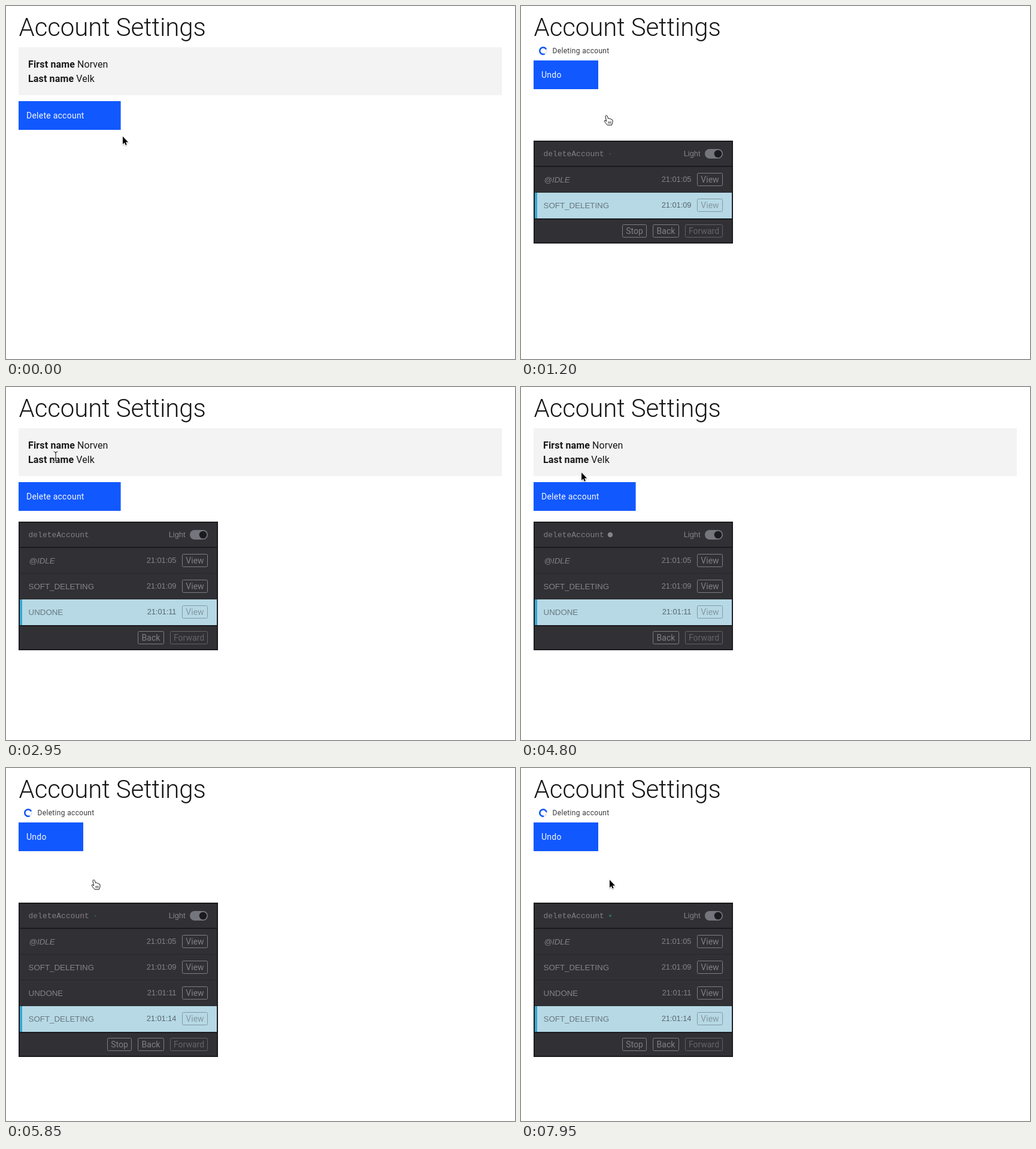
These frames come from a looping animation (850 by 590 pixels, 8 s). An HTML page:

```html
<!DOCTYPE html>
<html lang="en">
<head>
<meta charset="utf-8">
<title>Account Settings</title>
<style>
  html, body { margin: 0; width: 100%; height: 100%; overflow: hidden; background: #fff; }
  svg { display: block; width: 850px; height: 590px; }
  text { font: 14px Roboto, sans-serif; fill: #161616; }
  .title { font-size: 42px; font-weight: 300; letter-spacing: -.1px; }
  .field { font-size: 16px; letter-spacing: .05px; }
  .field .label { font-weight: 600; letter-spacing: .15px; }
  .action { fill: #f4f7ff; letter-spacing: .25px; }
  .status { font-size: 12px; letter-spacing: .33px; fill: #393939; }
  .machine { font: 13px "Liberation Mono", monospace; fill: #808085; }
  .state { font: 13.33px "Liberation Sans", sans-serif; fill: #838388; }
  .initial { font-style: italic; }
  .time { font: 12.8px "Liberation Sans", sans-serif; fill: #838388; text-anchor: end; }
  .button rect { fill: none; stroke: #7e7e83; }
  .button text { fill: #808085; text-anchor: middle; }
  .disabled { opacity: .65; }
  .active .state { fill: #68767f; }
  .active .time { fill: #59666f; }
  .active .button rect { stroke: #8299a5; }
  .active .button text { fill: #8598a3; }
</style>
</head>
<body>
<svg viewBox="0 0 850 590">
  <text class="title" x="21.5" y="49.5">Account Settings</text>
  <g id="profile">
    <rect x="21" y="69" width="807" height="80" fill="#f3f3f3"/>
    <text class="field" x="37" y="103"><tspan class="label">First name</tspan> Norven</text>
    <text class="field" x="37" y="127"><tspan class="label">Last name</tspan> Velk</text>
  </g>
  <g id="progress">
    <g fill="none" stroke-width="2.6">
      <circle cx="37" cy="75" r="5.7" stroke="#e8eaf0"/>
      <circle id="spinner" cx="37" cy="75" r="5.7" stroke="#1158f5" pathLength="100" stroke-dasharray="75 25"/>
    </g>
    <text class="status" x="52.5" y="79">Deleting account</text>
  </g>
  <rect id="actionBox" x="21" height="48"/>
  <g id="focus" fill="none">
    <rect x="21.5" y="159.5" width="170" height="47" stroke="#1158ff"/>
    <rect x="22.5" y="160.5" width="168" height="45" stroke="#5a8af5"/>
  </g>
  <text id="actionText" class="action" x="34"></text>
  <g id="panel"></g>
  <circle id="dot" cx="149" cy="247"/>
  <g id="pointer">
    <g id="ring" fill="none">
      <circle r="31.6" stroke="#fff" stroke-opacity=".6" stroke-width="2"/>
      <circle r="30.6" stroke="#111" stroke-width="1.5"/>
    </g>
    <path id="arrow" d="M0 0V13L2.9 10.2 4.7 14.6 6.7 13.8 4.9 9.4H9Z" fill="#000" stroke="#fff"
      stroke-width="1.6" paint-order="stroke" style="filter:drop-shadow(0 1px 1px #0004)"/>
    <g id="hand" fill="#fff" stroke="#111" stroke-linejoin="round" stroke-linecap="round">
      <path d="M-1.6 8.5L-3 1.9Q-3.2 .3 -1.7 0T.2 1.2L1.6 5.3Q2.3 4 3.6 4.8L4.2 5.8Q5.3 4.7 6.4 6L6.8 6.9Q8.6 6.3 9 8.2
        V11.5L7.4 16H.2L-3.7 11.4Q-5.6 8.9 -4.2 8.2T-1.6 9.7Z"/>
      <path d="M2 10.3V13.3M4 10.3V13.3M6 10.3V13.3" stroke-width=".8"/>
    </g>
    <g id="beam" fill="none" stroke-linecap="round">
      <path d="M-3 -8Q0 -8 0 -5.5Q0 -8 3 -8M0 -6V6M-3 8Q0 8 0 5.5Q0 8 3 8M-1.5 3H1.5" stroke="#fff" stroke-width="2.4"/>
      <path d="M-3 -8Q0 -8 0 -5.5Q0 -8 3 -8M0 -6V6M-3 8Q0 8 0 5.5Q0 8 3 8M-1.5 3H1.5" stroke="#111"/>
    </g>
  </g>
</svg>
<script>
const LOOP = 8000;
const PULSE = 1000;
const SPIN = 690;
const PRESS = 130;
const CLICKS = [1100, 2700, 5750];
const LOG = [
  ['@IDLE', '21:01:05'],
  ['SOFT_DELETING', '21:01:09'],
  ['UNDONE', '21:01:11'],
  ['SOFT_DELETING', '21:01:14'],
];
// Pointer path: time, x, y
const PATH = [
  [0, 195, 218], [200, 194, 217], [400, 181, 204], [600, 155, 188], [750, 144, 183],
  [1750, 144, 183], [1900, 134, 171], [2150, 97, 129], [2350, 83, 116],
  [4450, 83, 116], [4600, 87, 122], [4800, 101, 143], [5000, 121, 165], [5300, 148, 187],
];

const $ = id => document.getElementById(id);
const show = (id, on) => $(id).style.display = on ? '' : 'none';
const setAttrs = (id, attrs) => Object.entries(attrs).forEach(([k, v]) => $(id).setAttribute(k, v));
const within = (t, from, to) => t >= from && t < to;

function pointerAt(t) {
  const next = PATH.findIndex(p => p[0] > t);
  if (next < 0) return PATH[PATH.length - 1].slice(1);
  const [a, b] = [PATH[next - 1], PATH[next]];
  const k = (t - a[0]) / (b[0] - a[0]);
  return [1, 2].map(i => a[i] + (b[i] - a[i]) * k);
}

const box = (x, y, w, h, fill) => `<rect x="${x}" y="${y}" width="${w}" height="${h}" fill="${fill}"/>`;

const button = (label, x, width, cy, extra = '') => `<g class="button ${extra}">
  <rect x="${x + .5}" y="${cy - 10.5}" width="${width - 1}" height="21" rx="2"/>
  <text x="${x + width / 2}" y="${cy + 5}">${label}</text></g>`;

function row([name, time], i, active) {
  const y = 269 + 43 * i;
  const back = active
    ? box(23, y, 329, 43, '#b6d9e5') + box(23, y, 4, 43, '#35a7cf')
    : box(23, y + 42, 329, 1, '#28282c');
  return `<g class="${active ? 'active' : ''}">${back}
    <text class="state ${i ? '' : 'initial'}" x="${i ? 37.5 : 38.5}" y="${y + 26}">${name}</text>
    <text class="time" x="284.5" y="${y + 25}">${time}</text>
    ${button('View', 294, 43, y + 21)}</g>`;
}

function panelMarkup(count, running) {
  const end = 269 + 43 * count;
  const cy = end + 21;
  return box(21, 225, 333, end + 42 - 225, '#1b1b1f')
    + box(23, 227, 329, 40, '#313135')
    + box(23, 269, 329, end - 269, '#313135')
    + box(23, end + 2, 329, 38, '#313135')
    + '<text class="machine" x="37.5" y="251">deleteAccount</text>'
    + '<text class="time" x="299.5" y="251">Light</text>'
    + '<rect x="307" y="239" width="30" height="16" rx="8" fill="#75757d"/>'
    + '<circle cx="329" cy="247" r="6.3" fill="#1b1b1f"/>'
    + LOG.slice(0, count).map((entry, i) => row(entry, i, i === count - 1)).join('')
    + (running ? button('Stop', 169, 41, cy) : '')
    + button('Back', 220, 44, cy)
    + button('Forward', 274, 63, cy, 'disabled');
}

let shownStep = -1;
function showStep(step, deleting) {
  if (step === shownStep) return;
  shownStep = step;
  show('profile', !deleting);
  show('progress', deleting);
  setAttrs('actionBox', deleting ? { y: 91, width: 108 } : { y: 159, width: 170.6 });
  $('actionText').textContent = deleting ? 'Undo' : 'Delete account';
  setAttrs('actionText', { y: deleting ? 120 : 188 });
  $('panel').innerHTML = step ? panelMarkup(step + 1, deleting) : '';
}

function drawDot(step, deleting, age) {
  show('dot', step > 0);
  if (deleting) {
    const phase = age % PULSE / PULSE;
    setAttrs('dot', { r: 4.5 * (1 - (1 - phase) ** 2), fill: '#2f9a80', opacity: 1 - phase });
  } else {
    const grow = Math.min(1, Math.max(0, (age - 270) / 250));
    setAttrs('dot', { r: 4.2 * grow, fill: '#85858a', opacity: 1 });
  }
}

function draw(t) {
  const step = CLICKS.filter(c => t >= c).length;
  const deleting = step % 2 === 1;
  const age = t - (CLICKS[step - 1] || 0);
  showStep(step, deleting);
  drawDot(step, deleting, age);
  const gap = age / SPIN * 360 - 35;
  setAttrs('spinner', { transform: `rotate(${gap - 315} 37 75)` });

  const [x, y] = pointerAt(t);
  const hover = deleting
    ? within(x, 21, 129) && within(y, 91, 139)
    : within(x, 21, 192) && within(y, 159, 207);
  const pressed = CLICKS.some(c => within(t, c - PRESS, c));
  setAttrs('actionBox', { fill: pressed ? '#0039c4' : hover ? '#0a4ce8' : '#1158ff' });
  show('focus', pressed && !deleting);

  let kind = 'arrow';
  if (hover || within(t, 1100, 1750) || within(t, 5750, 5900)) kind = 'hand';
  else if (within(t, 2700, 4600)) kind = 'beam';
  for (const id of ['arrow', 'hand', 'beam']) show(id, id === kind);
  show('ring', pressed);
  setAttrs('pointer', { transform: `translate(${x} ${y})` });
}

const start = performance.now();
function tick() {
  draw((performance.now() - start) % LOOP);
  requestAnimationFrame(tick);
}
tick();
</script>
</body>
</html>
```
